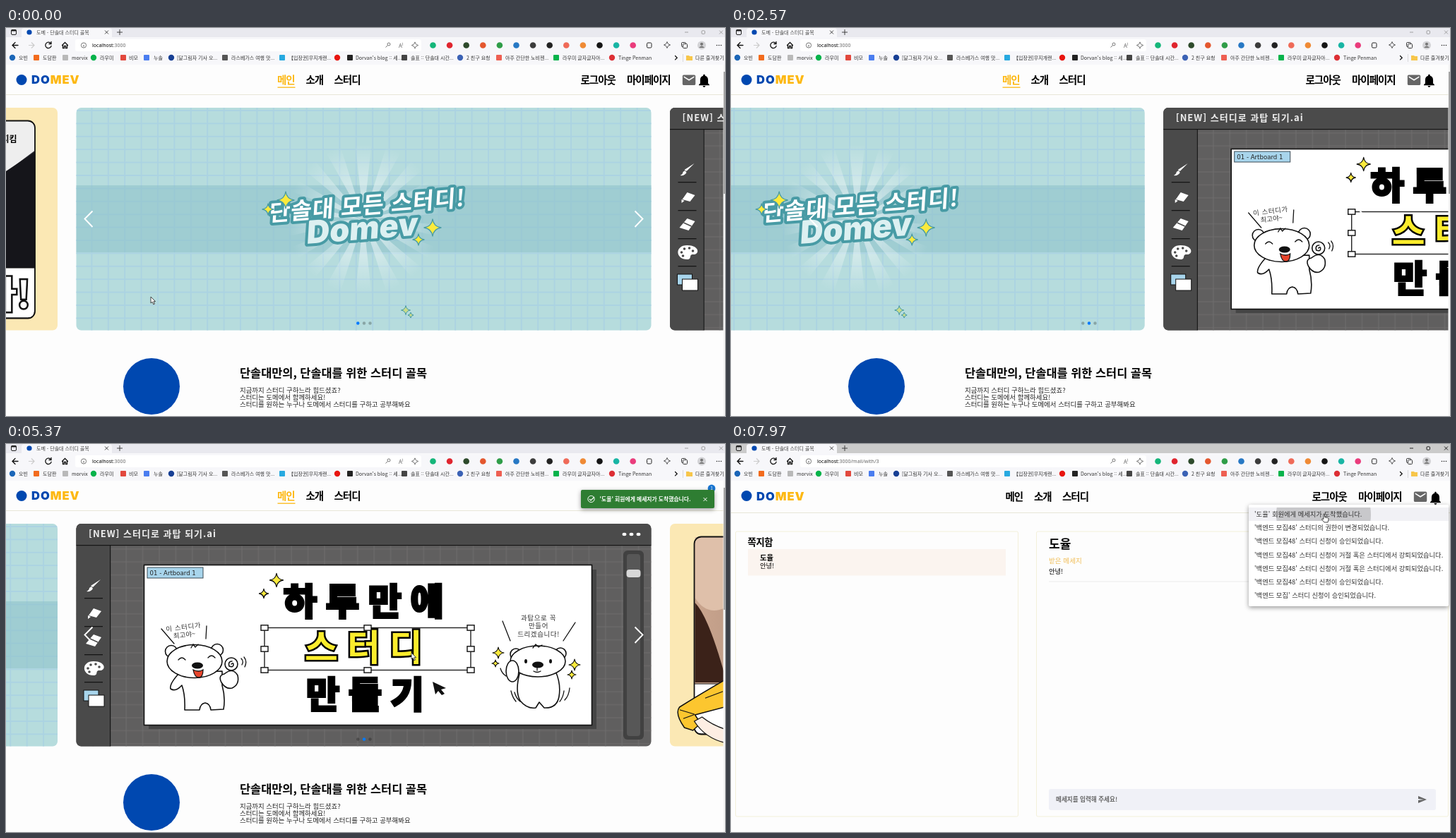
Recreate the animation shown at these times as an HTML page. Size 1018x550 px, loop 8000 ms.

```html
<!DOCTYPE html>
<html lang="ko">
<head>
<meta charset="utf-8">
<style>
html, body { margin: 0; width: 100%; height: 100%; overflow: hidden; background: #fdfdfd; }
svg { display: block; width: 1018px; height: 550px; font-family: 'Noto Sans CJK KR', 'Noto Sans CJK', sans-serif; }
text { white-space: pre; }
.nav { font-size: 14.5px; font-weight: 700; letter-spacing: -1px; }
.brand { font: 900 16.5px Inter, sans-serif; letter-spacing: 1px; }
.hero { font-weight: 900; fill: #fff; stroke: #489ba5; stroke-linejoin: round; paint-order: stroke; }
.big { font-size: 51px; font-weight: 900; letter-spacing: 13px; stroke: #000; stroke-width: 4; paint-order: stroke; }
.ink { fill: #fff; stroke: #111; stroke-width: 1.6; stroke-linejoin: round; stroke-linecap: round; }
.line { fill: none; stroke: #111; stroke-width: 1.3; stroke-linecap: round; }
.shade { filter: drop-shadow(0 2px 3px rgba(0,0,0,.4)); }
</style>
</head>
<body>
<svg id="stage" viewBox="0 0 1018 550"></svg>
<script>
const BLUE = '#0048b0', GOLD = '#fdb813', TEAL = '#489ba5';
const text = (x, y, size, str, more = '') => `<text x="${x}" y="${y}" font-size="${size}" ${more}>${str}</text>`;
const rect = (x, y, w, h, fill, more = '') => `<rect x="${x}" y="${y}" width="${w}" height="${h}" fill="${fill}" ${more}/>`;
const oval = (x, y, rx, ry, fill, more = '') => `<ellipse cx="${x}" cy="${y}" rx="${rx}" ry="${ry}" fill="${fill}" ${more}/>`;
const dot = (x, y, r, fill, more) => oval(x, y, r, r, fill, more);
const path = (d, more = 'class="line"') => `<path d="${d}" ${more}/>`;
const each = (list, fn) => list.map(fn).join('');
const range = n => [...Array(n).keys()];
const star = (x, y, r, edge, w = 1.3, fill = '#fbea3c') => {
  const k = r * .13;
  return path(`M${x} ${y - r}Q${x + k} ${y - k} ${x + r} ${y}Q${x + k} ${y + k} ${x} ${y + r}Q${x - k} ${y + k} ${x - r} ${y}Q${x - k} ${y - k} ${x} ${y - r}Z`,
    `fill="${fill}" stroke="${edge}" stroke-width="${w}" stroke-linejoin="round"`);
};

// ---- browser frame ----
const bookmarks = [
  [9, 18, '오빈', '#1b66b8'], [43, 52, '도담판', '#f26b1d'], [84, 93, 'morvix', '#b9b9b9'], [124, 133, '라우미', '#06b34b'],
  [166, 174, '비모', '#e2483d'], [199, 209, '누솔', '#4a7df0'], [234, 242, '[달그림자 기사 오...', '#173f94'],
  [310, 319, '라스베가스 여행 맛...', '#555'], [391, 400, '【입장권]무지개랜...', '#27a9e0'], [469, 0, '', '#e8150f'],
  [487, 495, "Dorvan's blog :: 세...", '#222'], [564, 573, '솔표 :: 단솔대 시간...', '#444'], [643, 652, '2 친구 요청', '#3b62b5'],
  [698, 707, '아주 간단한 노비젠...', '#ee5f52'], [779, 788, '라우미 글자글자아...', '#06b34b'], [858, 867, 'Tinge Penman', '#dd2f35']
];
const addons = ['#15b67a', '#e0252e', '#2d4a2b', '#e4572e', '#2f9d48', '#2778c4', '#3c3c3c', '#222', '#ef6a58', '#ef8a35', '#151515', '#18b5a4', '#ea3c7c'];
const chrome = () => `
  ${rect(0, 0, 1018, 52, '#f7f7fa')}
  <rect id="strip" width="1018" height="13"/>
  ${path('M22 13V4Q22 0 26 0H146Q150 0 150 4V13Z', 'fill="#f7f7fa"')}
  ${rect(7.5, 2.5, 7, 7, 'none', 'stroke="#222" rx="1.5"')}${rect(7.5, 2.5, 7, 2, '#222')}
  ${dot(33, 6, 3.6, BLUE)}${text(43, 8.6, 7, '도메 - 단솔대 스터디 골목', 'fill="#444"')}
  ${path('M140 3.5l5 5m0-5l-5 5M157 6h8m-4-4v8', 'stroke="#333" stroke-width=".9"')}
  <g id="controls" fill="none" stroke-width=".9"><path d="M961 6h5M1010 3.5l5 5m0-5l-5 5"/><rect x="985" y="3.8" width="4.5" height="4.5" rx="1"/></g>
  ${path('M17 24.5H9m4-4l-4 4 4 4')}
  ${path('M32 24.5h8m-4-4l4 4-4 4', 'fill="none" stroke="#ccc" stroke-width="1.2"')}
  ${path('M63.5 22a4.2 4.2 0 1 0 .6 3.4M64 19.5v3h-3')}${path('M79.5 24.5l4-4 4 4M80.5 24v4.5h2v-3h2v3h2V24')}
  ${rect(98, 16, 490, 17, '#fff', 'rx="3"')}
  ${dot(110, 24.5, 3.6, 'none', 'stroke="#555" stroke-width=".8"')}${path('M110 24v2.5M110 22.4v.2', 'stroke="#555"')}
  <text y="27" x="122" style="font:7px 'Noto Sans',sans-serif">localhost<tspan fill="#666">:3000</tspan><tspan fill="#666" id="url"></tspan></text>
  ${dot(542, 23, 2, 'none', 'stroke="#777"')}${path('M540.5 24.5l-3 3', 'stroke="#777"')}${text(556, 27.5, 8, 'A⁾', 'fill="#666"')}
  ${star(579, 24.5, 4.6, '#555', .8, 'none')}
  ${each(addons, (c, i) => dot(604.5 + i * 23.6, 24.5, 4.3, c))}
  ${rect(907.5, 21, 6.5, 7, 'none', 'rx="1.5" stroke="#222"')}${star(936, 24, 4.5, '#333', .8, 'none')}
  ${rect(956.5, 20.5, 6, 6, 'none', 'stroke="#333" rx="1"')}${rect(958.5, 22.5, 6, 6, '#f7f7fa', 'stroke="#333" rx="1"')}
  ${dot(985, 24.5, 6, '#d3d3d6')}${dot(985, 22.8, 2.1, '#777')}${path('M981 28q4-5 8 0z', 'fill="#777"')}
  ${each([0, 1, 2], i => dot(1006.5 + i * 3, 24.5, .8, '#222'))}
  ${each(bookmarks, ([ix, tx, s, c], i) => (i % 3 ? rect(ix - 4, 38, 8, 8, c, 'rx="1"') : dot(ix, 42, 4.2, c)) + text(tx, 44.7, 7, s, 'fill="#333"'))}
  ${path('M947.5 39.5l2.7 2.7-2.7 2.7')}${rect(958, 37, .7, 11, '#ccc')}
  ${path('M963 39h4l1 1h4v6h-9z', 'fill="#f7c64a"')}${text(976, 44.7, 7, '다른 즐겨찾기', 'fill="#333"')}`;

// ---- site header ----
const bellShape = 'M12 22c1.1 0 2-.9 2-2h-4c0 1.1.89 2 2 2zm6-6v-5c0-3.07-1.64-5.64-4.5-6.32V4c0-.83-.67-1.5-1.5-1.5s-1.5.67-1.5 1.5v.68C7.63 5.36 6 7.92 6 11v5l-2 2v1h16v-1l-2-2z';
const mailShape = 'M20 4H4c-1.1 0-1.99.9-1.99 2L2 18c0 1.1.9 2 2 2h16c1.1 0 2-.9 2-2V6c0-1.1-.9-2-2-2zm0 4l-8 5-8-5V6l8 5 8-5v2z';
const header = main => {
  const d = main ? 0 : 4.5, y = main ? 78.5 : 79.5, o = y - 78.5;
  const item = (x, s, more = '') => `<text class="nav" x="${x}" y="${y}" ${more}>${s}</text>`;
  return dot(22, 73.5, 7.5, BLUE) +
    `<text class="brand" x="36" y="${79 + o / 2}" fill="${BLUE}">DO<tspan fill="${GOLD}">MEV</tspan></text>` +
    item(384 + d, '메인', main ? `fill="${GOLD}"` : '') + item(424.5 + d, '소개') + item(464.5 + d, '스터디') +
    item(813.5 + 2 * d, '로그아웃') + item(879 + 2 * d, '마이페이지') +
    (main ? rect(384.5, 83.5, 25, 1.3, GOLD) : '') +
    path(mailShape, `fill="#666" transform="translate(${956 + 2 * d} ${62.7 + o}) scale(.92)"`) +
    path(bellShape, `${main ? 'id="bell"' : ''} transform="translate(${977.3 + 2 * d} ${63.5 + 2 * o}) scale(.93)"`) +
    rect(0, main ? 94 : 97, 1018, 1, '#e8e6d8');
};

// ---- carousel slides, each drawn at the centre position ----
const ray = i => {
  const p = a => `${506 + 125 * Math.cos(a)} ${271 + 105 * Math.sin(a)}`, a = (i + .5) * Math.PI / 9;
  return `M506 271L${p(a - .09)}L${p(a + .09)}Z`;
};
const tilt = (x, y, art) => `<g transform="translate(${x} ${y}) rotate(-4.5) skewX(-8)">${art}</g>`;
const heroLine = edge => tilt(372, 274, text(0, 0, 32.5, '단솔대 모든 스터디!', `class="hero" stroke-width="${edge}" letter-spacing=".8"`));
const slideStudy = () => `
  ${rect(99, 113, 816, 316, '#b6dcdd')}${rect(99, 113, 816, 316, 'url(#grid1)')}
  ${rect(99, 223, 816, 95, '#8fc3cb', 'opacity=".6"')}
  ${path(range(18).map(ray).join(''), 'fill="url(#glow)"')}
  ${heroLine(8)}
  ${tilt(425, 306, text(0, 0, 45, 'Domev', 'class="hero" stroke-width="8" style="font-family:Inter,sans-serif;fill:#dcf0f1"'))}
  ${heroLine(4)}
  ${each([[396, 244, 12], [371, 257, 8], [604, 283, 12], [584, 300, 8]], ([x, y, r]) => star(x, y, r, TEAL))}
  ${star(566, 400, 6.5, TEAL, 1, '#c9dc8a')}${star(573, 407, 4, TEAL, 1, '#c9dc8a')}`;

const bearLeft = () => `<g class="ink">
  ${path('M246 324Q231 340 233 347Q240 352 249 342Q254 356 253 377L274 377Q275 368 282 367Q289 368 290 377L308 376Q311 360 306 342L306 322Z', '')}
  <circle cx="234" cy="294" r="8.5"/><circle cx="299" cy="292" r="8.5"/>
  <ellipse cx="267" cy="308" rx="39" ry="23.5"/>
  <path d="M318 318l-3 24"/><circle cx="319" cy="312" r="9"/>
  <path d="M319 312q3-3 3 1t-6 2q-2-7 4-7"/>
  <path d="M305 338Q300 328 309 326Q321 316 328 328Q331 341 320 346Q311 348 305 338Z"/></g>
  ${path('M244 306q5-6 10 0M286 303q5-6 10 0M262 289l3-5 3 4 4-4M333 304q4 4 1 9M337 302q5 6 1 14')}
  ${oval(271, 314, 8, 4.5, '#111')}${path('M265 320q8 4 14 0q0 11-6 11q-6 0-8-11z', 'fill="#e8452c" stroke="#111" stroke-width="1.3"')}`;
const bearRight = () => `<g class="ink">
  ${path('M728 322Q720 350 728 364Q738 376 750 374L755 366L762 374Q780 375 783 358Q786 340 778 322Z', '')}
  <circle cx="722" cy="298" r="8"/><circle cx="785" cy="297" r="8"/>
  <ellipse cx="753" cy="308" rx="39" ry="22"/>
  <ellipse cx="717" cy="322" rx="9" ry="15"/></g>
  ${path('M752 317v4m-5 1q5 3 10 0M746 289l4-5 4 4 5-3M720 352q2 8 8 13M715 350q2 9 7 15M790 350q-1 9-6 15M798 346q-1 11-7 17M700 318q2 7 8 11')}
  ${oval(736, 308, 2, 3, '#111')}${oval(771, 308, 2, 3, '#111')}${oval(753, 313, 8, 4.5, '#111')}
  ${each([[697, 296, 8], [693, 311, 5], [805, 313, 8], [801, 327, 6]], ([x, y, r]) => star(x, y, r, '#111', 1.2))}`;

const slideArt = () => `
  ${rect(99, 113, 816, 316, '#605f5f')}${rect(99, 113, 816, 316, 'url(#grid2)')}
  ${rect(99, 113, 48, 316, '#4a4a4a')}${rect(99, 113, 816, 30, '#4b4b4b')}
  ${rect(99, 143, 816, 1.2, '#151515')}${rect(147, 143, 1.2, 286, '#151515')}
  ${text(117, 132, 13, '[NEW] 스터디로 과탑 되기.ai', 'fill="#eee" font-weight="700" letter-spacing="1"')}
  ${each([875.5, 885.5, 895.5], x => oval(x, 128, 2.9, 2.2, '#fff'))}
  ${each([218, 258, 298, 337], y => rect(111, y, 26, 1.3, '#151515'))}
  ${path('M134 192l-11 11-3-2zM121 202l2 3q-3 5-9 4q4-2 4-5z', 'fill="#fff"')}
  ${path('M124 233l11 4-7 9-11-3zM116 243l4 2-4 3z', 'fill="#fff"')}
  ${path('M124 270l11 4-9 13-13-4z', 'fill="#fff"')}${path('M119 276l11 5', 'stroke="#4a4a4a" stroke-width="1.5"')}
  ${path('M124 308c18 0 18 14 8 13c-6 0-1 7-8 7c-17 0-18-20 0-20z', 'fill="#fff"')}
  ${each([[116, 318], [120, 313], [127, 312], [132, 316], [118, 323]], ([x, y]) => dot(x, y, 1.8, '#4a4a4a'))}
  ${rect(110, 349, 21, 15, '#a8d5ec', 'stroke="#111"')}${rect(117, 356, 22, 16, '#fff', 'stroke="#111"')}
  ${rect(202, 178, 634, 226, '#454545')}${rect(195.5, 171.5, 634, 227, '#fff', 'stroke="#111" stroke-width="1.6"')}
  ${rect(200, 175, 79, 15, '#a8d5ec', 'stroke="#3a4a55"')}
  ${text(203.5, 186, 8.6, '01 - Artboard 1', 'style="font-family:\'DejaVu Sans\',sans-serif" fill="#222"')}
  ${rect(874, 151, 29, 268, '#414141', 'rx="6"')}${rect(879, 156, 19, 258, '#575757', 'rx="4"')}${rect(878.5, 178, 20, 11, '#d8d8d8', 'rx="4"')}
  ${star(383, 193, 9.5, '#111')}${star(365, 212, 6.5, '#111')}
  ${text(393, 242, 51, '하루만에', 'class="big"')}
  ${text(423, 307, 51, '스터디', 'class="big" style="fill:#fbec2c;stroke-width:5"')}
  ${text(425, 374, 51, '만들기', 'class="big"')}
  ${rect(366, 260.5, 292, 60, 'none', 'stroke="#222" stroke-width="1.4"')}
  ${each([366, 512, 658], x => each([260.5, 290.5, 320.5], y => x === 512 && y === 290.5 ? '' : rect(x - 5, y - 3.7, 10, 7.4, '#fff', 'stroke="#111" stroke-width="1.4"')))}
  ${path('M604 337l19 9-7 2 5 6-4 2-5-6-4 5z', 'fill="#111"')}
  <g fill="#333"><g transform="rotate(-7 252 266)">${text(252, 263, 9.5, '이 스터디가', 'text-anchor="middle" letter-spacing=".6"')}${text(252, 274, 9.5, '최고야~', 'text-anchor="middle"')}</g>
  ${each(['과탑으로 꼭', '만들어', '드리겠습니다!'], (s, i) => text(754, 250 + i * 11.3, 9.5, s, 'text-anchor="middle" letter-spacing=".6"'))}</g>
  ${path('M220 262l18 21M284 258l-1 18M703 251l11 28M806 253l-17 26')}
  ${bearLeft()}${bearRight()}`;

const slidePhone = () => `
  ${rect(99, 113, 816, 316, '#fbe8b4')}
  ${rect(134, 131.5, 747.5, 280, 'url(#photo)', 'rx="10"')}
  ${path('M620 132H871Q881 132 881 142V174L830 212L620 300Z', 'fill="#eee"')}
  ${path('M620 300L830 210L881 176V340H620Z', 'fill="#15151a"')}
  ${path('M135 132H190V225Q155 250 135 218Z', 'fill="#dfc0aa"')}${path('M135 225Q155 245 180 338H135Z', 'fill="#3b2219"')}
  ${path('M134 340H881V401Q881 411 871 411H144Q134 411 134 401Z', 'fill="#fff" stroke="#111"')}
  ${rect(134, 131.5, 747.5, 280, 'none', 'rx="10" stroke="#111" stroke-width="1.8"')}
  ${text(856, 162, 12, '스터디 지킴', 'text-anchor="end" font-weight="900"')}
  ${text(875, 397, 52, '간다!', 'text-anchor="end" font-weight="900" fill="#fff" stroke="#111" stroke-width="5" paint-order="stroke"')}
  ${path('M180 333Q150 350 113 373Q106 382 120 402L132 406L143 396L135 384L180 372Z', 'fill="#fcc62f" stroke="#111" stroke-width="1.5"')}
  ${path('M134 393L145 387Q160 399 180 405V424Q150 418 134 393Z', 'fill="#fdeee3" stroke="#111" stroke-width="1.3"')}
  ${path('M114 377l20 6M119 389l14-5M150 360l24-9')}`;
const slide = (shift, art) => `<g transform="translate(${shift})"><g clip-path="url(#card)">${art}</g></g>`;

const home = () => `<g id="home">
  ${header(true)}
  <g id="track">${slide(-840.5, slidePhone())}${slide(0, slideStudy())}${slide(840.5, slideArt())}${slide(1681, slidePhone())}</g>
  ${path('M122.5 259.5l-11 11 11 11.5M890.5 259.5l11 11-11 11.5', 'fill="none" stroke="#fff" stroke-width="1.9"')}
  ${each([498.3, 507, 515.5], x => dot(x, 418.5, 2.2, '', 'class="page"'))}
  ${dot(206, 508, 40, BLUE)}
  ${text(331, 495, 16.4, '단솔대만의, 단솔대를 위한 스터디 골목', 'font-weight="700"')}
  ${each(['지금까지 스터디 구하느라 힘드셨죠?', '스터디는 도메에서 함께하세요!', '스터디를 원하는 누구나 도메에서 스터디를 구하고 공부해봐요'], (s, i) => text(331, 517 + i * 10.2, 9.45, s, 'fill="#222"'))}
  <g id="bar">${rect(1015.5, 52, 2.5, 498, '#f5f5f5')}${rect(1016, 62, 2, 173, '#a5a5a5')}</g>
  <g id="badge">${dot(999, 63, 5.4, '#1976d2')}${text(999, 65.3, 6.5, '1', 'fill="#fff" text-anchor="middle"')}</g></g>`;

const mail = () => `<g id="mail">${header(false)}
  ${rect(6.5, 124, 400, 404, 'none', 'stroke="#f3f0da" rx="2"')}${rect(432.5, 124, 583, 404, 'none', 'stroke="#f3f0da" rx="2"')}
  ${text(23.5, 143.5, 13.3, '쪽지함', 'font-weight="700" letter-spacing="-.3"')}
  ${rect(24, 149, 365, 37.5, '#fbf4ef')}
  ${text(41, 164.5, 10.3, '도율', 'font-weight="700"')}${text(41, 175.5, 9.3, '안녕!')}
  ${text(450, 148, 17, '도율', 'font-weight="700"')}
  ${text(450, 169, 9.6, '받은 메세지', 'fill="#f0bd55"')}${text(450, 184, 9.3, '안녕!')}
  ${rect(450, 194.5, 548, 1, '#ececec')}${rect(450, 489, 548, 30, '#f0f1f7', 'rx="3"')}
  ${text(460, 507, 8.6, '메세지를 입력해 주세요!', 'fill="#666" font-weight="700"')}
  ${path('M973 499l12 5-12 5v-4l8-1-8-1z', 'fill="#666"')}</g>`;

const notices = ["'도율' 회원에게 메세지가 도착했습니다.", "'백엔드 모집48' 스터디의 권한이 변경되었습니다.", "'백엔드 모집48' 스터디 신청이 승인되었습니다.",
  ...Array(2).fill("'백엔드 모집48' 스터디 신청이 거절 혹은 스터디에서 강퇴되었습니다."),
  "'백엔드 모집48' 스터디 신청이 승인되었습니다.", "'백엔드 모집' 스터디 신청이 승인되었습니다."];
const menu = () => `<g id="menu">${rect(733, 86, 283, 144, '#fff', 'rx="2" class="shade"')}
  ${rect(733, 90, 283, 19, '#f1f1f5', 'id="hover"')}<circle id="ripple" cx="839" cy="100" clip-path="url(#row)"/>
  ${each(notices, (s, i) => text(741, 102.8 + i * 19.25, 9.3, s, 'fill="#333"'))}</g>`;
const toast = () => `<g id="toast">${rect(814, 65, 189, 26, '#2e7d32', 'rx="2" class="shade"')}
  ${dot(828.5, 78, 4.6, 'none', 'stroke="#fff"')}${path('M826 78l2 2 5-5', 'fill="none" stroke="#fff" stroke-width="1.1"')}
  ${text(840.5, 80.8, 7.8, "'도율' 회원에게 메세지가 도착했습니다.", 'fill="#fff" font-weight="700"')}
  ${path('M987.5 76l5 5m0-5l-5 5', 'stroke="#fff"')}</g>`;
const pointer = () => `<g id="pointer" fill="#fff" stroke="#333" stroke-width=".9" stroke-linejoin="round">
  <path id="arrow" d="M0 0V9L2.2 7.2 3.8 10.8 5.4 10.1 3.9 6.7H6.6Z"/>
  <path id="hand" d="M0 1Q0-.5 1.2 0L2 5 5.5 5.5Q7.5 6 7 8L6 12H1L-2.5 8Q-2.5 6 0 7.5Z"/></g>`;

const $ = id => document.getElementById(id);
$('stage').innerHTML = `<defs>
  <clipPath id="card"><rect x="99.5" y="113" width="814" height="315.5" rx="7"/></clipPath>
  <clipPath id="row"><rect x="733" y="90" width="283" height="19"/></clipPath>
  <pattern id="grid1" x="97" y="116" width="23.4" height="18.4" patternUnits="userSpaceOnUse"><path d="M0 1H24M1 0V19" stroke="#abd3e2" stroke-width="1.8"/></pattern>
  <pattern id="grid2" x="99" y="111" width="23.4" height="18.4" patternUnits="userSpaceOnUse"><path d="M0 1H24M1 0V19" stroke="#6f6e6e"/></pattern>
  <radialGradient id="glow" gradientUnits="userSpaceOnUse" cx="506" cy="271" r="108"><stop offset=".3" stop-color="#fff" stop-opacity=".5"/><stop offset="1" stop-color="#fff" stop-opacity="0"/></radialGradient>
  <linearGradient id="photo"><stop stop-color="#caa58e"/><stop offset="1" stop-color="#2a2a30"/></linearGradient>
</defs>${rect(0, 0, 1018, 550, '#fdfdfd')}${home()}${mail()}${menu()}${toast()}${chrome()}${pointer()}`;

// ---- motion ----
const clamp = v => Math.max(0, Math.min(1, v));
const bezier = (x1, y1, x2, y2) => v => {
  v = clamp(v);
  const at = (a, b, u) => 3 * a * u * (1 - u) ** 2 + 3 * b * u * u * (1 - u) + u ** 3;
  let lo = 0, hi = 1;
  for (let i = 0; i < 24; i++) {
    const mid = (lo + hi) / 2;
    if (at(x1, x2, mid) < v) lo = mid; else hi = mid;
  }
  return at(y1, y2, lo);
};
const ease = bezier(.25, .1, .25, 1), standard = bezier(.4, 0, .2, 1);
const show = (id, on) => $(id).setAttribute('visibility', on ? 'visible' : 'hidden');
const set = (id, name, value) => $(id).setAttribute(name, value);
const grow = (id, p, fade, x, y) => {
  const s = .75 + .25 * p;
  set(id, 'transform', `translate(${x} ${y}) scale(${s} ${s * s}) translate(${-x} ${-y})`);
  set(id, 'opacity', fade);
};
const SLIDE = 2498.5, NOTICE = 3320, HIDE = 6367, FOCUS = 6420, OPEN = 6700, PRESS = 7805, LEAVE = 7930;
const stops = [[0, 205, 381], [250, 205, 381], [800, 225, 556], [2950, 520, 556], [3330, 556, 440], [3800, 574, 296],
  [5880, 574, 296], [6320, 988, 83], [6850, 988, 83], [7400, 839, 99], [8000, 839, 99]];

function draw(t) {
  const moved = t >= SLIDE, away = t >= LEAVE, alert = t >= NOTICE && t < OPEN;
  set('track', 'transform', `translate(${-840.5 * ease((t - SLIDE) / 300)})`);
  document.querySelectorAll('.page').forEach((el, i) => {
    el.setAttribute('fill', i === +moved ? '#007aff' : '#000');
    el.setAttribute('opacity', i === +moved ? 1 : .25);
  });
  set('home', 'display', away ? 'none' : 'inline');
  set('mail', 'display', away ? 'inline' : 'none');
  $('url').textContent = away ? '/mail/with/3' : '';
  show('bar', t < OPEN);
  show('badge', alert);
  set('bell', 'fill', alert ? '#f00' : '#000');
  set('strip', 'fill', t < FOCUS ? '#e9e9ef' : '#cbcbcb');
  set('controls', 'stroke', t < FOCUS ? '#999' : '#111');

  const out = t - HIDE, came = t - NOTICE;
  if (out < 0) grow('toast', standard(came / 133), standard(came / 200), 908.5, 78);
  else grow('toast', 1 - standard((out - 67) / 133), 1 - standard(out / 200), 908.5, 78);
  const opened = standard((t - OPEN) / 250);
  grow('menu', opened, opened, 1000, 86);
  const wave = standard((t - PRESS) / 550);
  set('ripple', 'r', 180 * wave);
  set('ripple', 'opacity', .1 + .2 * wave);

  const i = stops.findIndex((s, n) => n && t < s[0]);
  const [t0, x0, y0] = stops[i - 1], [t1, x1, y1] = stops[i];
  const p = (t - t0) / (t1 - t0), k = p * p * (3 - 2 * p);
  const x = x0 + (x1 - x0) * k, y = y0 + (y1 - y0) * k;
  set('pointer', 'transform', `translate(${x} ${y})`);
  const overRow = t > OPEN && x < 985 && y > 90, hand = overRow || (x > 978 && y < 90);
  show('hover', overRow);
  show('arrow', !hand);
  show('hand', hand);
}
const start = performance.now();
(function frame() {
  draw((performance.now() - start) % 8000);
  requestAnimationFrame(frame);
})();
</script>
</body>
</html>
```
